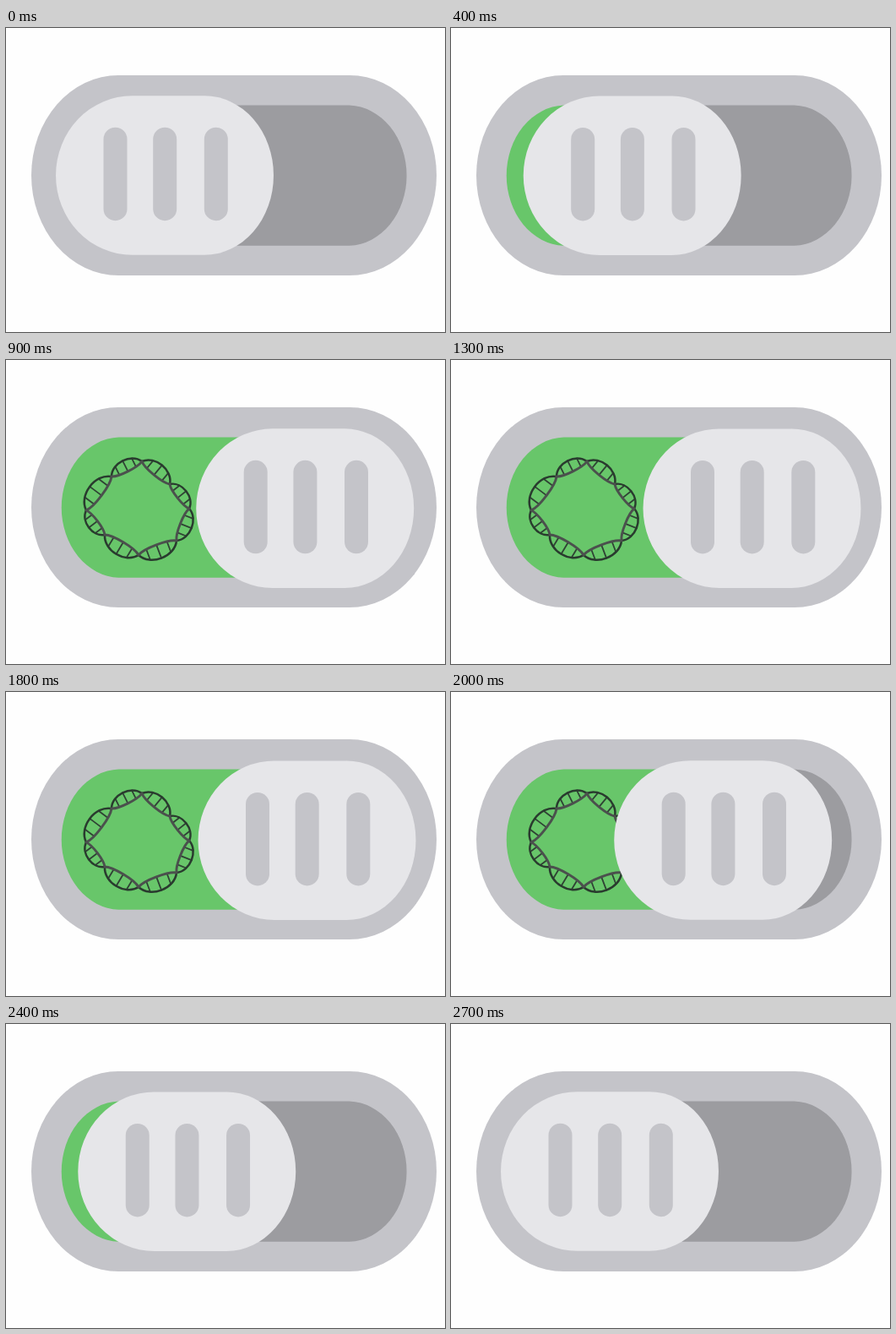
An HTML page that plays this animation: 520x360 px, repeating every 2800 ms.

```html
<!DOCTYPE html>
<html lang="en">
<head>
<meta charset="utf-8">
<title>Toggle</title>
<style>
  html, body { margin: 0; width: 100%; height: 100%; overflow: hidden; background: #fefefe; }
  svg { display: block; width: 100vw; height: 100vh; }
</style>
</head>
<body>
<svg viewBox="0 0 520 360">
  <rect x="30" y="56" width="480" height="237" rx="103" ry="118.5" fill="#c4c4c9"/>
  <path id="off" fill="#9c9ca0"/>
  <path id="on" fill="#68c66a"/>
  <g id="helix" fill="none" stroke-linecap="round" stroke-linejoin="round"></g>
  <g id="knob">
    <path d="M149.5 80.2H235A82 94.3 0 0 1 235 268.8H149.5A90.5 94.3 0 0 1 149.5 80.2Z" fill="#e6e6e9"/>
    <g fill="#c4c4c9">
      <rect x="115.5" y="117.7" width="28" height="110.5" rx="14"/>
      <rect x="174.2" y="117.7" width="28" height="110.5" rx="14"/>
      <rect x="234.8" y="117.7" width="28" height="110.5" rx="14"/>
    </g>
  </g>
</svg>
<script>
const LOOP = 2800, STEP = 100, TRAVEL = 168.5;
const [knob, on, off, helix] = ['knob', 'on', 'off', 'helix'].map(id => document.getElementById(id));

function stroke(d, color, width) {
  const p = document.createElementNS('http://www.w3.org/2000/svg', 'path');
  p.setAttribute('d', d);
  p.setAttribute('stroke', color);
  p.setAttribute('stroke-width', width);
  helix.appendChild(p);
}

// Points where the two strands cross, clockwise
const nodes = [[95, 178], [125, 138], [161, 120], [194, 147], [217, 176], [202, 214], [157, 231], [117, 207]];

// Cubic from a to b whose middle is pushed outward by a share of its length
function bow(a, b, share) {
  const dx = b[0] - a[0], dy = b[1] - a[1], h = share / 0.75;
  const side = k => [a[0] + dx * k + dy * h, a[1] + dy * k - dx * h];
  return [a, side(0.18), side(0.82), b];
}

function pointOn([a, b, c, d], u) {
  const v = 1 - u;
  return [0, 1].map(i => v ** 3 * a[i] + 3 * v * v * u * b[i] + 3 * v * u * u * c[i] + u ** 3 * d[i]);
}

const curve = ([a, b, c, d]) => `M${a}C${b} ${c} ${d}`;

nodes.forEach((a, i) => {
  const b = nodes[(i + 1) % nodes.length];
  const outer = bow(a, b, 0.27), inner = bow(a, b, -0.08);
  const rungs = [0.27, 0.5, 0.73].map(u => `M${pointOn(outer, u)}L${pointOn(inner, u)}`).join('');
  stroke(rungs, '#2f4334', 1.8);
  stroke(curve(outer), '#293b2e', 2.5);
  stroke(curve(inner), '#4b504d', 2.9);
});

const ease = u => (1 - Math.cos(Math.PI * u)) / 2;
const span = (t, start, length) => Math.min(1, Math.max(0, (t - start) / length));

function draw(now) {
  const t = Math.floor((now % LOOP) / STEP) * STEP;
  const x = TRAVEL * (ease(span(t, 204, 752)) - ease(span(t, 1800, 860) ** 0.83));
  knob.setAttribute('transform', `translate(${x.toFixed(2)} ${(x * 0.007).toFixed(2)})`);
  // The two track colours meet behind the knob
  const seam = Math.round(188 + x);
  on.setAttribute('d', `M${seam} 91.5H133.3A70 83.2 0 0 0 133.3 257.8H${seam}Z`);
  off.setAttribute('d', `M${seam} 91.5H407A70 83.2 0 0 1 407 257.8H${seam}Z`);
}

const begin = performance.now();
function tick() {
  draw(performance.now() - begin);
  requestAnimationFrame(tick);
}
tick();
</script>
</body>
</html>
```
